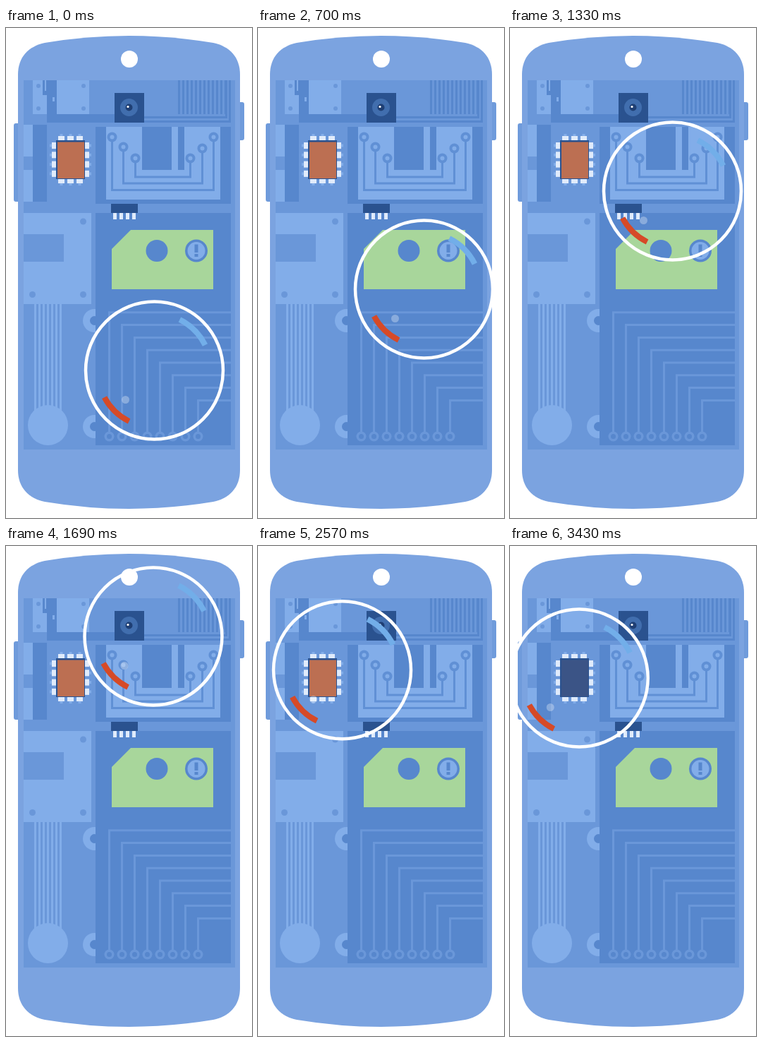
Write an HTML page that moves like this. It is 349 px wide and 694 px high and loops after 3.53 s.

```html
<!DOCTYPE html>
<html lang="en">
<head>
<meta charset="utf-8">
<title>Phone inspection</title>
<style>
  html, body { margin: 0; width: 100%; height: 100%; overflow: hidden; background: #fff; }
  svg { display: block; width: 100%; height: 100%; }
</style>
</head>
<body>
<svg id="stage" viewBox="0 0 349 694"></svg>
<script>
const C = {
  shell: '#7ba3e0', mid: '#6a97d9', dark: '#5787cd', light: '#82ade9',
  navy: '#2a528f', pin: '#e0ebfb', green: '#a8d69b', trace: '#6090d5'
};
const stage = document.getElementById('stage');

function add(tag, attrs, parent = stage) {
  const el = document.createElementNS('http://www.w3.org/2000/svg', tag);
  for (const key in attrs) el.setAttribute(key, attrs[key]);
  parent.appendChild(el);
  return el;
}
const rect = (x, y, width, height, fill, rx = 0) => add('rect', { x, y, width, height, fill, rx });
const dot = (cx, cy, r, fill) => add('circle', { cx, cy, r, fill });
const line = (d, stroke, width, parent) =>
  add('path', { d, stroke, fill: 'none', 'stroke-width': width }, parent);
const times = (n, fn) => { for (let i = 0; i < n; i++) fn(i); };
const node = (x, y, inner, color) => { dot(x, y, 7, color); dot(x, y, 3, inner); };

function drawCase() {
  rect(11, 135, 12, 111, '#6f9bdb', 3);
  rect(326, 105, 12, 54, '#6f9bdb', 3);
  add('path', {
    fill: C.shell,
    d: 'M17 66C17 41 32 26 55 21Q115 11 174.5 11Q234 11 294 21C317 26 332 41 332 66' +
       'V626C332 651 317 666 294 671Q234 681 174.5 681Q115 681 55 671C32 666 17 651 17 626Z'
  });
  dot(175, 44, 12, '#fff');
  rect(25, 74, 300, 523, C.mid);
}

function drawTop() {
  rect(38, 74, 80, 48, C.light);
  rect(52, 74, 6, 21, C.dark);
  rect(55, 74, 2, 15, C.light);
  rect(58, 74, 14, 60, C.dark);
  rect(66, 98, 3, 6, C.light);
  rect(58, 122, 96, 12, C.dark);
  for (const x of [46, 110]) for (const y of [82, 114]) dot(x, y, 3, C.mid);

  times(12, i => rect(244 + 6 * i, 74, 3, 48, C.dark));
  line('M196 126.5H312.5V74M196 132.5H317.5V74', C.dark, 3);

  rect(154, 92, 42, 42, C.navy);
  dot(174.5, 112.5, 12.5, '#416eae');
  dot(174.5, 112.5, 5, '#1f3f74');
  dot(173, 111.5, 1.6, '#fff');
}

function drawLeft() {
  rect(25, 137, 13, 109, C.light);
  rect(25, 182, 13, 19, C.mid);
  rect(38, 137, 20, 109, C.dark);

  rect(25, 262, 96, 129, C.light);
  rect(25, 292, 57, 39, C.mid);
  for (const [x, y] of [[109.5, 274], [37.5, 377.5], [109.5, 377.5]]) dot(x, y, 4.5, C.mid);

  times(7, i => rect(40 + 6 * i, 391, 3, 155, C.light));
  dot(59.5, 562.5, 28.5, C.light);
  for (const y of [414.5, 564.5]) {
    dot(125.5, y, 16.5, C.light);
    dot(125.5, y, 6.5, C.dark);
  }
}

function drawBoards() {
  rect(127, 140, 192, 109, C.dark);
  rect(142, 140, 162, 103, C.light);
  rect(193, 140, 42, 61, C.dark);
  rect(244, 140, 9, 61, C.dark);
  const loops = [[150.5, 154.5, 229.5, 294.5, 154.5], [166.5, 168.5, 220, 278.5, 170.5],
                 [183.5, 184.5, 211, 261.5, 184.5]];
  for (const [x1, y1, low, x2, y2] of loops) {
    line(`M${x1} ${y1}V${low}H${x2}V${y2}`, C.trace, 3);
    node(x1, y1, C.light, C.trace);
    node(x2, y2, C.light, C.trace);
  }

  rect(127, 262, 192, 329, C.dark);
  rect(149, 249, 38, 13, C.navy);
  times(4, i => rect(152 + 9 * i, 262, 5, 9, C.pin));
  times(8, i => {
    const x = 146.5 + 18 * i, y = 402.8 + 17.8 * i;
    line(`M319 ${y}H${x}V575`, C.mid, 3);
    node(x, 578.5, C.dark, C.mid);
    dot(x, 578.5, 3.5, C.dark);
  });
}

function drawCard() {
  add('path', { d: 'M150 313L177 286H294V370H150Z', fill: C.green });
  dot(214, 315.5, 15.5, C.dark);
  dot(270, 315.5, 16, C.dark);
  dot(270, 315.5, 12.5, C.light);
  rect(267.5, 306.5, 5, 11.5, C.dark);
  rect(267.5, 320, 5, 4, C.dark);
}

function drawChip() {
  times(4, i => {
    const y = 162 + 13.3 * i;
    rect(62, y + 2.5, 59, 4, C.light);
    rect(65, y, 53, 9, C.pin);
  });
  times(3, i => {
    const x = 74 + 13 * i;
    rect(x + 2.5, 150, 4, 73, C.light);
    rect(x, 153, 9, 67, C.pin);
  });
  rect(71, 159, 41, 55, C.navy);
  return rect(73, 161.5, 38, 51.5, '#bc6f52');
}

function arc(r, from, to) {
  const at = deg => {
    const a = deg * Math.PI / 180;
    return `${r * Math.cos(a)} ${r * Math.sin(a)}`;
  };
  return `M${at(from)}A${r} ${r} 0 0 1 ${at(to)}`;
}

function drawLens() {
  const g = add('g', {});
  add('circle', { r: 97.5, fill: 'none', stroke: '#fff', 'stroke-width': 4.5 }, g);
  line(arc(80.5, -63.5, -26.6), '#72aee9', 8, g);
  line(arc(80.5, 116.5, 151.7), '#d64a27', 8, g);
  add('circle', { cx: -41, cy: 41.5, r: 5.5, fill: '#fff', opacity: 0.3 }, g);
  return g;
}

drawCase();
drawTop();
drawLeft();
drawBoards();
drawCard();
const chip = drawChip();
const lens = drawLens();

// Tempo: [number of steps, ms per step]
const tempo = [[21, 50], [23, 40], [11, 100], [9, 40], [1, 100]];
const loop = tempo.reduce((sum, [n, ms]) => sum + n * ms, 0);
// Lens path: [step, x, y]
const path = [[0, 210.5, 485], [14, 235.5, 370], [21, 247.7, 312], [28, 230.5, 231],
              [37, 209, 128], [53.1, 98.2, 187], [65, 98.2, 187]];
const warm = [188, 111, 82], cold = [59, 84, 134];
const mix = (a, b, k) => a + (b - a) * k;

function stepAt(t) {
  let step = 0;
  for (const [n, ms] of tempo) {
    if (t < n * ms) return step + Math.floor(t / ms);
    t -= n * ms;
    step += n;
  }
  return step - 1;
}

function render(t) {
  const s = stepAt(t);
  const i = path.findIndex(p => p[0] > s);
  const a = path[i - 1], b = path[i];
  const k = (s - a[0]) / (b[0] - a[0]);
  lens.setAttribute('transform', `translate(${mix(a[1], b[1], k)} ${mix(a[2], b[2], k)})`);
  const fade = Math.max(0, (s - 53) / 11);
  chip.setAttribute('fill', `rgb(${warm.map((v, j) => Math.round(mix(v, cold[j], fade)))})`);
}

const start = performance.now();
function tick() {
  render((performance.now() - start) % loop);
  requestAnimationFrame(tick);
}
render(0);
requestAnimationFrame(tick);
</script>
</body>
</html>
```
